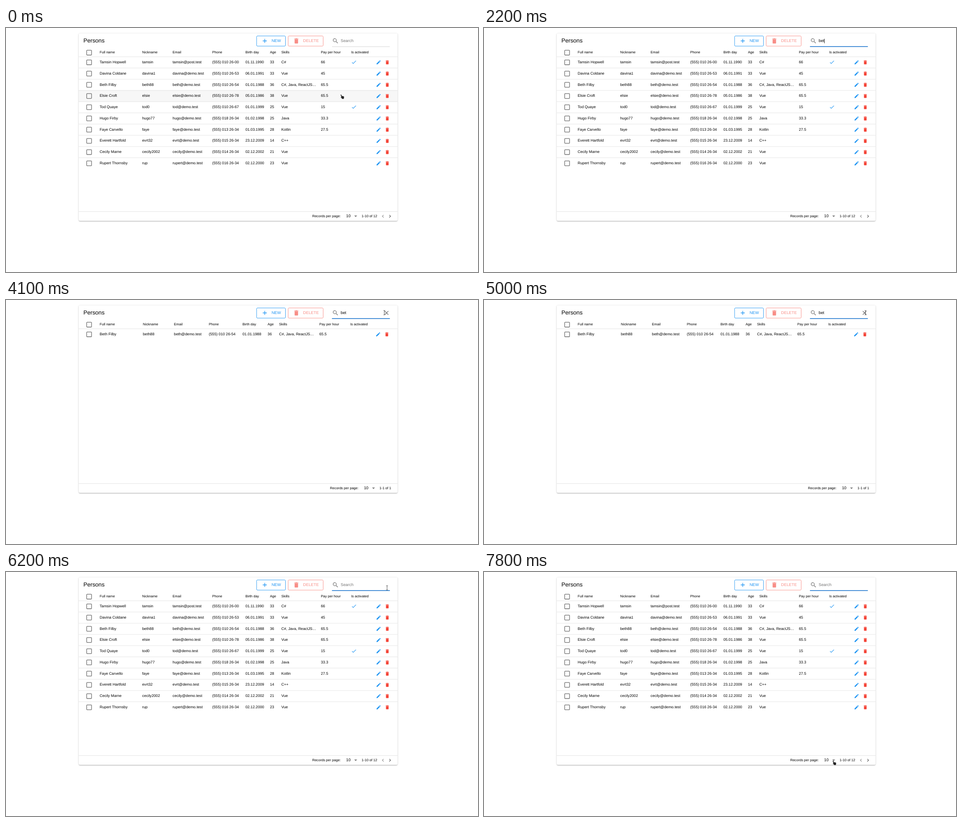
These frames come from a looping animation (1038 px wide and 539 px high, 8000 ms). An HTML page:

```html
<!DOCTYPE html>
<html lang="en">
<head>
<meta charset="utf-8">
<title>Persons</title>
<style>
  html, body { margin: 0; width: 100%; height: 100%; overflow: hidden; background: #fff; }
  .card {
    position: absolute; left: 160px; top: 12px; width: 701px; height: 414.4px;
    border-radius: 2.5px; background: #fff;
    box-shadow: 0 .6px 3.2px rgba(0,0,0,.2), 0 1.3px 1.3px rgba(0,0,0,.14), 0 1.9px .6px -1.3px rgba(0,0,0,.12);
  }
  svg { position: absolute; left: 0; top: 0; display: block; }
  text { font-family: "Liberation Sans", Arial, sans-serif; font-size: 8.26px; text-rendering: geometricPrecision; white-space: pre; }
  .small { font-size: 7.62px; }
  .control { font-size: 8.89px; }
  .title { font-size: 12.7px; }
  .rule { stroke: #000; stroke-opacity: .13; stroke-width: .8; }
  .box { fill: none; stroke: #6b6b6b; stroke-width: 1.27; }
</style>
</head>
<body>
<div class="card"></div>
<svg id="stage" width="1038" height="539" viewBox="0 0 1038 539"></svg>
<script>
const BLUE = '#2196f3', RED = '#f44336', PRIMARY = '#1976d2', GREY = '#757575';
const HEAD = 63.6, ROW = 24.78, LOOP = 8000;

const ICONS = {
  plus: 'M19 13h-6v6h-2v-6H5v-2h6V5h2v6h6z',
  bin: 'M6 19c0 1.1.9 2 2 2h8c1.1 0 2-.9 2-2V7H6zM19 4h-3.5l-1-1h-5l-1 1H5v2h14z',
  edit: 'M3 17.25V21h3.75L17.81 9.94l-3.75-3.75zM20.71 7.04a1 1 0 0 0 0-1.41l-2.34-2.34a1 1 0 0 0-1.41 0l-1.83 1.83 3.75 3.75z',
  check: 'M9 16.17L4.83 12l-1.42 1.41L9 19 21 7l-1.41-1.41z',
  search: 'M15.5 14h-.79l-.28-.27a6.5 6.5 0 1 0-.7.7l.27.28v.79l5 4.99L20.49 19zm-6 0a4.5 4.5 0 1 1 0-9 4.5 4.5 0 0 1 0 9z',
  close: 'M19 6.41L17.59 5 12 10.59 6.41 5 5 6.41 10.59 12 5 17.59 6.41 19 12 13.41 17.59 19 19 17.59 13.41 12z',
  down: 'M7 10l5 5 5-5z',
  prev: 'M15.41 7.41L14 6l-6 6 6 6 1.41-1.41L10.83 12z',
  next: 'M10 6L8.59 7.41 13.17 12l-4.58 4.59L10 18l6-6z'
};

const HEADERS = ['Full name', 'Nickname', 'Email', 'Phone', 'Birth day', 'Age', 'Skills', 'Pay per hour', 'Is activated'];
const PEOPLE = `
Tamsin Hopwell|tamsin|tamsin@post.test|(555) 010 26-00|01.11.1990|33|C#|66|y
Davina Coldane|davina1|davina@demo.test|(555) 010 26-53|06.01.1991|33|Vue|45|
Beth Filby|beth88|beth@demo.test|(555) 010 26-54|01.01.1988|36|C#, Java, ReactJS…|65.5|
Elsie Croft|elsie|elsie@demo.test|(555) 010 26-78|05.01.1986|38|Vue|65.5|
Tod Quaye|tod0|tod@demo.test|(555) 010 26-67|01.01.1999|25|Vue|15|y
Hugo Firby|hugo77|hugo@demo.test|(555) 018 26-34|01.02.1998|25|Java|33.3|
Faye Carvello|faye|faye@demo.test|(555) 013 26-34|01.03.1995|28|Kotlin|27.5|
Everett Hartfold|evrt32|evrt@demo.test|(555) 015 26-34|23.12.2009|14|C++||
Cecily Marne|cecily2002|cecily@demo.test|(555) 014 26-34|02.12.2002|21|Vue||
Rupert Thornsby|rup|rupert@demo.test|(555) 016 26-34|02.12.2000|23|Vue||`
  .trim().split('\n').map(line => line.split('|'));

const text = (x, y, s, cls = '', fill = '#000') => `<text x="${x}" y="${y}" class="${cls}" fill="${fill}">${s}</text>`;
const icon = (name, cx, cy, size, fill, opacity = 1) =>
  `<path d="${ICONS[name]}" fill="${fill}" opacity="${opacity}" transform="translate(${cx - size / 2} ${cy - size / 2}) scale(${size / 24})"/>`;
const rule = y => `<path class="rule" d="M160 ${y}H861"/>`;
const box = cy => `<rect class="box" x="177.45" y="${cy - 5.35}" width="10.7" height="10.7" rx="1"/>`;
const button = (x, w, name, label, color, opacity) =>
  `<g opacity="${opacity}"><rect x="${x}" y="17.6" width="${w}" height="22.4" rx="2" fill="none" stroke="${color}" stroke-width=".9"/>` +
  icon(name, x + 18, 28.5, 15.24, color) + text(x + 32.8, 31.2, label, 'control', color) + '</g>';

function table(id, people, cols, iconShift, footShift, range) {
  let out = `<g id="${id}">` + HEADERS.map((h, i) => text(cols[i], 56.2, h, 'small')).join('');
  people.forEach((person, r) => {
    const dy = r * ROW, mid = 75.9 + dy;
    out += box(mid) + person.slice(0, 8).map((s, i) => text(cols[i], 78 + dy, s)).join('');
    if (person[8]) out += icon('check', 765.2, mid - .4, 12.7, BLUE);
    out += icon('edit', 819.4 + iconShift, mid, 11.9, BLUE) + icon('bin', 838.5 + iconShift, mid, 11.6, RED);
    if (r < people.length - 1) out += rule(HEAD + ROW + dy);
  });
  out += text(673.4 + footShift, 417.7, 'Records per page:', 'small') + text(748 + footShift, 418.2, '10', 'control') +
    icon('down', 769 + footShift, 415.6, 15.24, GREY) + text(782 + footShift, 417.7, range, 'small');
  return out + '</g>';
}

const stage = document.getElementById('stage');
stage.innerHTML =
  `<rect id="hover" x="160" width="701" height="${ROW}" fill="#000" opacity=".03"/>` +
  text(170.2, 31.9, 'Persons', 'title') +
  button(551.1, 63.5, 'plus', 'NEW', BLUE, 1) + button(620.5, 77, 'bin', 'DELETE', RED, .6) +
  icon('search', 724.6, 28.5, 15.24, GREY) +
  text(736, 31.2, 'Search', 'control" id="hint', GREY) + text(736, 31.2, '', 'control" id="query') +
  '<path d="M717 41.2H844" stroke="#000" stroke-opacity=".24" stroke-width=".7"/>' +
  `<path id="focus" stroke="${PRIMARY}" stroke-width="1.4"/>` +
  '<path id="caret" d="M0 23.8V33.8" stroke="#000" stroke-width=".8"/>' +
  box(54.4) + rule(HEAD) + rule(405.5) +
  table('all', PEOPLE, [206, 299.5, 366.3, 453.5, 526.4, 580.4, 605.5, 692.5, 759], 0, 0, '1-10 of 12') +
  '<g id="pager">' + icon('prev', 829, 415.8, 12.7, '#000', .5) + icon('next', 844.4, 415.8, 12.7, '#000', .75) + '</g>' +
  table('found', [PEOPLE[2]], [206, 301, 369.3, 446, 520, 575.3, 600.5, 689, 757], -1, 39.2, '1-1 of 1') +
  `<g id="clear">${icon('close', 836.9, 28.5, 15.24, GREY)}</g>` +
  `<g id="pointer" stroke-linejoin="round">
    <path id="hand" d="M.1 1Q.9-.4 2 .8L3.2 3.4 6.6 4Q8.2 4.4 8.1 6L7.5 10.3H3.4L2.6 8.6.5 7.2Q-.2 6 1.8 6Z" fill="#222" stroke="#fff" stroke-width=".4"/>
    <path id="beam" d="M-2-5Q0-5 0-4Q0-5 2-5M0-4V4M-2 5Q0 5 0 4Q0 5 2 5" fill="none" stroke="#444" stroke-width=".9"/>
    <path id="arrow" d="M0 0V9.6L2.3 7.5 3.8 10.8 5.3 10.1 3.8 7H6.9Z" fill="#222" stroke="#fff" stroke-width=".4"/>
  </g>`;

// time, shape, x, y, hovered row
const POINTER = [
  [0, 'hand', 735.5, 146.5, 3],
  [200, 'hand', 736, 142, 3],
  [300, 'hand', 737, 131, 2],
  [400, 'hand', 739, 116, 2],
  [500, 'hand', 742, 98, 1],
  [600, 'hand', 745, 79, 0],
  [700, 'arrow', 748, 60, -1],
  [800, 'arrow', 750, 46, -1],
  [900, 'beam', 751, 33, -1],
  [1000, 'beam', 752, 28, -1],
  [1800, '', 0, 0, -1],
  [3700, 'arrow', 942, 30, -1],
  [3800, 'arrow', 915, 29, -1],
  [3900, 'arrow', 882, 27, -1],
  [4000, 'arrow', 855, 25, -1],
  [4100, 'beam', 832, 28, -1],
  [4200, 'beam', 823, 28, -1],
  [4400, 'beam', 829, 28, -1],
  [4500, 'beam', 835, 28, -1],
  [4600, 'beam', 839, 28, -1],
  [6100, 'beam', 839, 30, -1],
  [6200, 'beam', 838, 35, -1],
  [6300, 'arrow', 835, 46, -1],
  [6400, 'arrow', 830, 58, -1],
  [6500, 'hand', 824, 69, 0],
  [7100, 'hand', 776, 230.3, 3],
  [7200, 'hand', 774, 270, 7],
  [7300, 'hand', 772, 302, 9],
  [7400, 'arrow', 770, 332, -1],
  [7500, 'arrow', 769, 360, -1],
  [7600, 'arrow', 768, 384, -1],
  [7700, 'arrow', 767, 404, -1],
  [7800, 'hand', 766.5, 416.5, -1]
];

// time, typed text, caret, focus line share, filtered
const FIELD = [
  [0, '', 0, 0, 0],
  [1100, '', 0, .6, 0],
  [1200, '', 0, 1, 0],
  [1800, 'b', 1, 1, 0],
  [2000, 'be', 1, 1, 0],
  [2100, 'be', 0, 1, 0],
  [2200, 'bet', 1, 1, 0],
  [3300, 'bet', 1, 1, 1],
  [3400, 'bet', 0, 1, 1],
  [4500, 'bet', 1, 1, 1],
  [4800, 'bet', 0, 1, 1],
  [5100, '', 0, 1, 0]
];

const $ = id => document.getElementById(id);
const show = (id, on) => { $(id).style.display = on ? '' : 'none'; };
const at = (steps, t) => steps.findLast(step => step[0] <= t);

function draw(t) {
  const [, shape, x, y, row] = at(POINTER, t);
  const [, typed, caret, share, filtered] = at(FIELD, t);

  ['hand', 'beam', 'arrow'].forEach(name => show(name, name === shape));
  $('pointer').setAttribute('transform', `translate(${x} ${y})`);
  show('hover', row >= 0);
  $('hover').setAttribute('y', HEAD + Math.max(row, 0) * ROW);

  const query = $('query');
  query.textContent = typed;
  show('hint', !typed);
  show('caret', caret);
  $('caret').setAttribute('transform', `translate(${736.3 + (typed ? query.getComputedTextLength() : 0)} 0)`);
  show('focus', share);
  $('focus').setAttribute('d', `M${780.5 - 63.7 * share} 41H${780.5 + 63.7 * share}`);

  show('all', !filtered);
  show('pager', !filtered);
  show('found', filtered);
  show('clear', filtered);
}

const start = performance.now();
function tick() {
  draw((performance.now() - start) % LOOP);
  requestAnimationFrame(tick);
}
tick();
</script>
</body>
</html>
```
